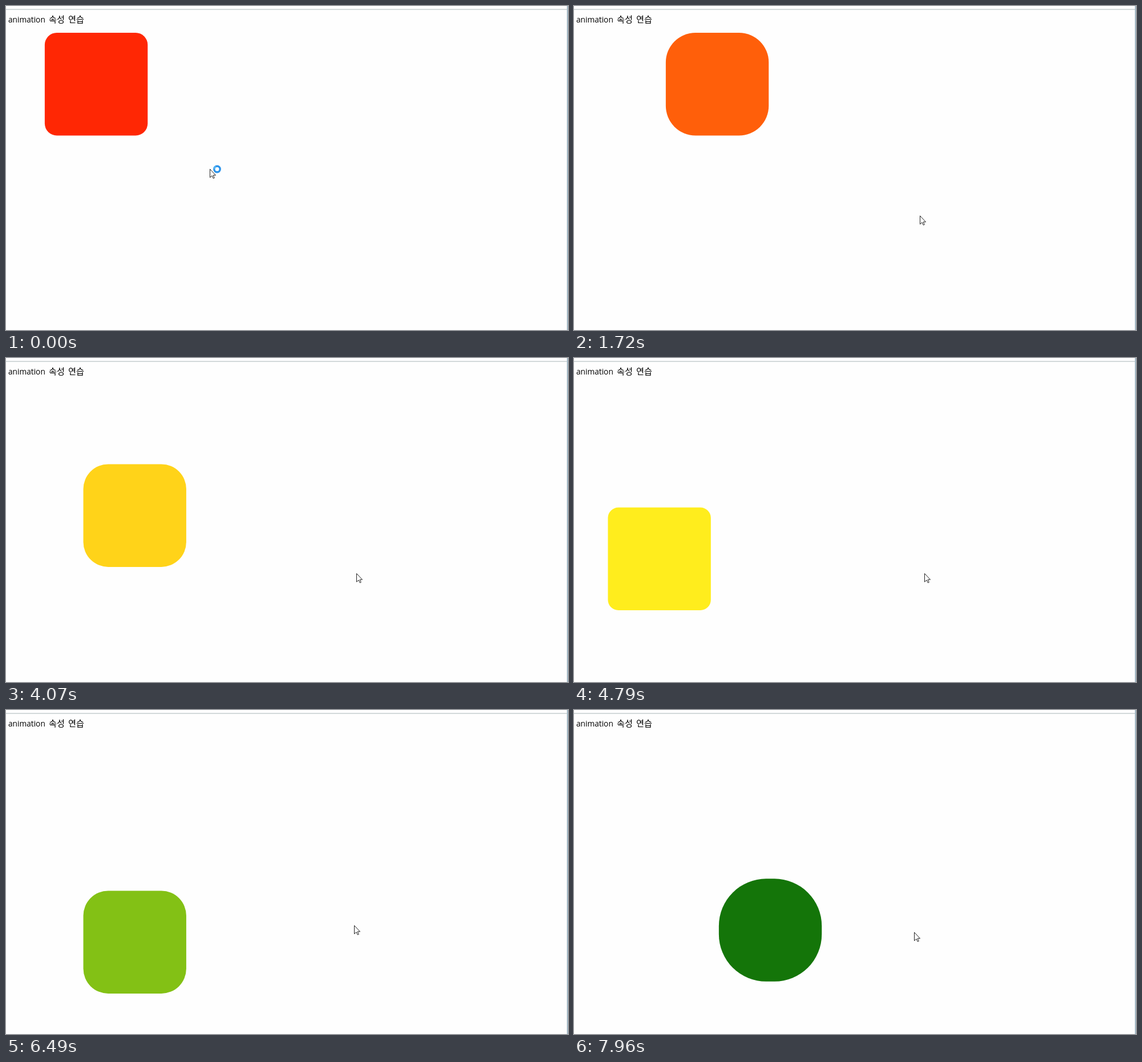
Write an HTML page that moves like this. It is 985 px wide and 569 px high and loops after 8 s.

```html
<!DOCTYPE html>
<html lang="ko">
<head>
<meta charset="utf-8">
<title>animation 속성 연습</title>
<style>
  html, body { margin: 0; width: 100%; height: 100%; overflow: hidden; background: #fefefe; }
  svg { display: block; }
  .latin { font: 13.7px "Open Sans", "Noto Sans", sans-serif; }
  .hangul { font: 15.2px "Noto Sans CJK KR", "Noto Sans CJK", sans-serif; }
</style>
</head>
<body>
<svg width="985" height="569" viewBox="0 0 985 569">
  <rect width="985" height="569" fill="#fefefe"/>
  <rect y="5.5" width="983" height="1" fill="#aab6b8"/>
  <rect x="983.5" width="1" height="569" fill="#4f7890"/>
  <text class="latin" x="4" y="28.5">animation</text>
  <text class="hangul" y="28.8"><tspan x="75">속성</tspan><tspan x="109">연습</tspan></text>
  <rect id="box" width="180.4" height="180.4"/>
  <g id="cursor">
    <path d="M.5 .5V15.2L4 12l2.3 4.8 2-.9L6.1 11.2h4.4Z" fill="#fff" stroke="#222" stroke-width="1"/>
    <g id="busy" fill="none" stroke-width="3.4">
      <circle cx="13" cy="0.5" r="5.2" fill="#fff" stroke="#2b93ea"/>
      <path d="M7.8 .5A5.2 5.2 0 0 1 11 -4.3" stroke="#55b4f3"/>
    </g>
  </g>
</svg>
<script>
const LOOP = 8000;
const STEP = 78;           // ms between screen refreshes
const STEPS_PER_LEG = 32;
const RELOAD = 3;          // step at which the page restarts its animation
const TRAVEL = 270.5;

const colors = [[255, 0, 0], [255, 165, 18], [255, 255, 32], [0, 127, 10], [255, 0, 0]];

// Pointer glides in steps: start, end, destination
const home = [357, 286];
const glides = [
  { from: 13, to: 22, tip: [606, 368] },
  { from: 22, to: 27, tip: [626, 380] },
  { from: 41, to: 46, tip: [614, 378] },
  { from: 80, to: 83, tip: [610, 378] },
  { from: 92, to: 102, tip: [596, 390] }
];

const box = document.getElementById("box");
const cursor = document.getElementById("cursor");
const busy = document.getElementById("busy");

const clamp = v => Math.min(1, Math.max(0, v));
const mix = (a, b, k) => a.map((v, i) => Math.round(v + (b[i] - v) * k));

function legsAt(step) {
  const elapsed = step < RELOAD ? step + 7.5 : Math.max(0, step - 3.5);
  return elapsed / STEPS_PER_LEG;
}

function drawBox(legs) {
  const across = 1 - Math.abs(1 - legs % 2);
  const down = clamp(Math.min(legs - 1, 4 - legs));
  const leg = Math.floor(legs);
  box.setAttribute("x", 4.5 + TRAVEL * across);
  box.setAttribute("y", 47 + TRAVEL * down);
  box.setAttribute("rx", 90 * across);
  box.setAttribute("fill", `rgb(${mix(colors[leg], colors[leg + 1], legs - leg)})`);
}

function drawCursor(step) {
  const tip = glides.reduce(
    (at, g) => mix(at, g.tip, clamp((step - g.from) / (g.to - g.from))), home);
  cursor.setAttribute("transform", `translate(${tip})`);
  busy.setAttribute("visibility", step < RELOAD ? "visible" : "hidden");
}

const begin = performance.now();
function tick() {
  const step = Math.floor((performance.now() - begin) % LOOP / STEP);
  drawBox(legsAt(step));
  drawCursor(step);
  requestAnimationFrame(tick);
}
tick();
</script>
</body>
</html>
```
